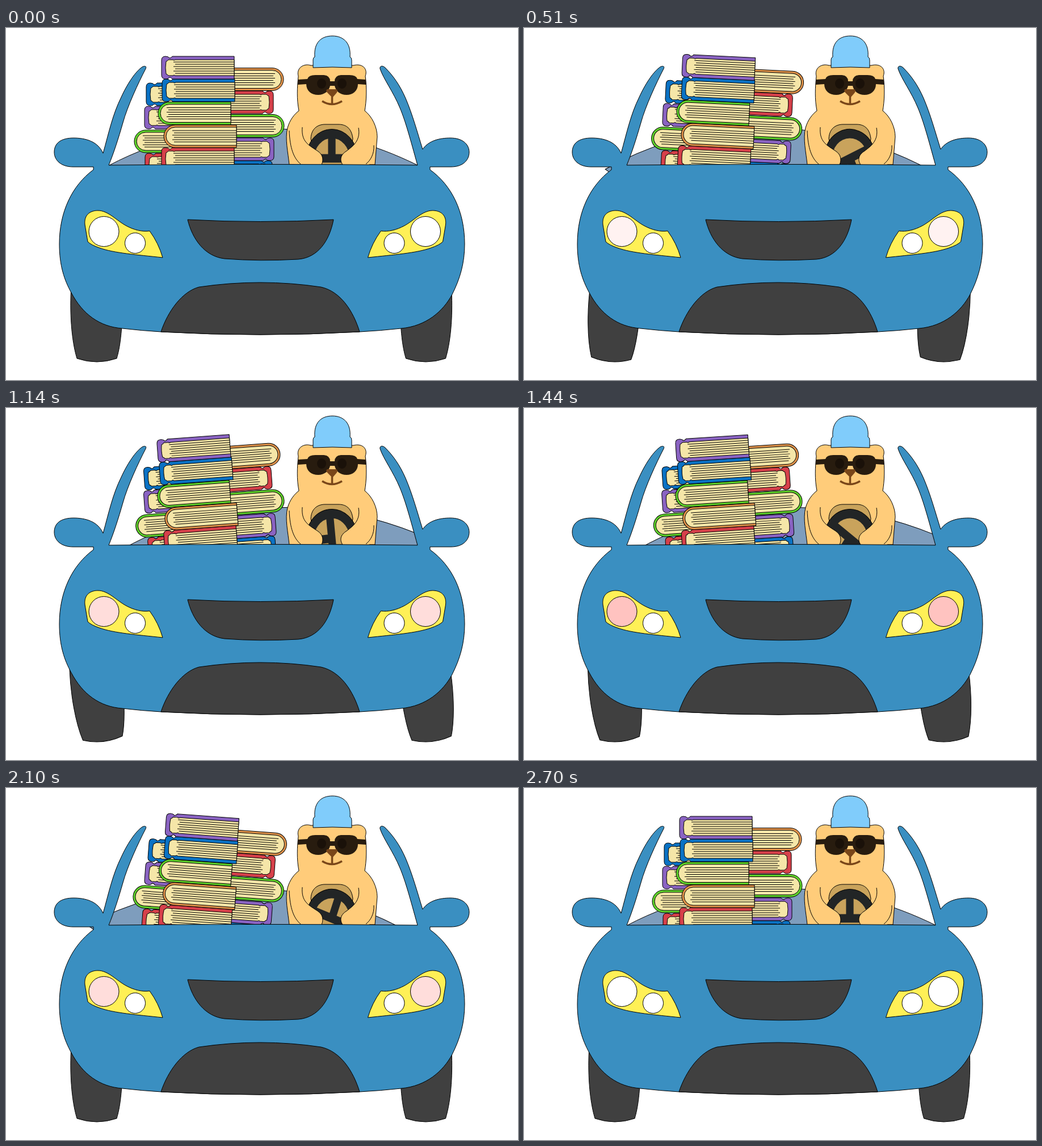
Write an HTML page that moves like this. It is 902 px wide and 621 px high and loops after 2730 ms.

```html
<!DOCTYPE html>
<html lang="en">
<head>
<meta charset="utf-8">
<title>Bear driving a car full of books</title>
<style>
html, body { margin: 0; width: 100%; height: 100%; overflow: hidden; background: #fff; }
svg { display: block; width: 902px; height: 621px; }
.line { fill: none; }
</style>
</head>
<body>
<svg viewBox="0 0 902 621" stroke="#000" stroke-width="1" stroke-linejoin="round">
  <defs>
    <path id="tyre" d="M115 455C112 500 115 550 125 583Q160 595 195 583C202 560 205 530 207 455Z" fill="#404040"/>
    <path id="lamp" d="M139 347C137 328 150 322 162 322C180 322 195 340 212 349C225 356 240 360 253 358Q269 380 276 405C230 400 190 397 165 388Q150 383 144 377Z" fill="#fff056"/>
  </defs>

  <path id="seat" d="M144 264C240 204 340 178 450 177C560 177 650 205 725 242L732 250V280H170Z" fill="#7e9dbd"/>
  <g id="stack"></g>

  <g id="bear">
    <path d="M499 241C497 220 491 195 496 176C500 162 508 152 516 146C512 125 513 105 515 85C511 70 525 62 537 66H612C627 62 638 71 633 85C636 105 635 130 632 146C645 156 654 175 654 192L650 241Z" fill="#ffcc7a"/>
    <path d="M537 195C538 175 552 170 562 170H586C600 170 609 178 611 195L605 241H545Z" fill="#c9a35c"/>
    <g transform="translate(574 230) scale(.88 1)">
      <g id="steer" fill="none" stroke="#222526">
        <circle r="43.5" stroke-width="16"/>
        <path d="M0 -42V0M-42 0H42" stroke-width="15"/>
        <circle r="51.5" stroke="#000"/>
      </g>
    </g>
    <g fill="#ffcc7a">
      <path d="M522 175C520 200 532 206 549 217C558 223 560 232 556 241H508L522 175Z" stroke="none"/>
      <path d="M621 176C625 198 612 208 600 217C590 223 587 232 593 241H640L621 176Z" stroke="none"/>
    </g>
    <path class="line" d="M522 175C520 200 532 206 549 217C558 223 560 232 556 241M621 176C625 198 612 208 600 217C590 223 587 232 593 241M499 181C500 212 507 230 519 240M648 207C649 222 642 234 634 240"/>
    <path d="M541 70V56Q541 52 544 51C542 26 555 14 575 14C595 14 608 27 606 51Q609 52 609 57V70Q575 68 541 70Z" fill="#80ccfb"/>
    <g stroke="none" fill="#281c0f">
      <path d="M514 91L531 90Q533 83 545 83H560Q571 84 571 94H579Q579 84 590 83H605Q617 83 619 90L634 91V100L620 99C620 111 611 118 600 118C588 118 581 111 579 102H571C569 111 561 118 550 118C538 118 529 111 529 99L514 100Z"/>
      <g fill="#1a1109"><ellipse cx="556" cy="98" rx="8" ry="9"/><ellipse cx="592" cy="98" rx="8" ry="9"/></g>
      <path d="M566 108H582Q586 110 582 115L575 123L567 115Q562 110 566 108Z" fill="#7a4719"/>
    </g>
    <path class="line" d="M574.5 121V133M557 129Q574 140 592 129" stroke="#7a4719" stroke-width="3.5"/>
  </g>

  <g id="tyreL"><use href="#tyre"/></g>
  <g id="tyreR"><use href="#tyre" transform="translate(899.5 0) scale(-1 1)"/></g>

  <path d="M154 245H118C98 245 85 234 85 219C85 203 97 194 119 194C140 194 162 200 171 221C181 185 188 152 203 122C213 100 226 80 237 71C242 66 249 66 246 72C233 97 214 138 206 167C198 195 190 220 181 242Q450 239 725 242C712 195 704 165 694 141C682 112 665 90 659 72C658 66 664 66 668 70C682 84 694 101 704 124C716 152 725 185 734 214C745 198 765 194 783 194C804 194 816 205 816 219C816 234 804 245 784 245H747V250C786 278 808 325 808 381C808 415 800 442 786 470C770 500 740 526 696 530Q660 534 623 536Q448 546 273 536Q240 534 205 530C165 527 135 505 115 467C103 445 94 420 94 381C94 325 116 278 154 250Z" fill="#3a8fc1"/>
  <g fill="#404040">
    <path d="M320 338Q448 345 577 338C570 375 550 405 515 408Q448 412 385 407C350 403 328 372 320 338Z"/>
    <path d="M273 536C285 500 310 465 340 457Q448 441 555 457C590 465 612 500 623 536Q448 546 273 536Z"/>
  </g>
  <use href="#lamp"/>
  <use href="#lamp" transform="translate(913.5 0) scale(-1 1)"/>
  <g id="glow"><circle cx="172.5" cy="359" r="26.5"/><circle cx="739" cy="359" r="26.5"/></g>
  <g fill="#fff"><circle cx="227.5" cy="379.5" r="18"/><circle cx="684" cy="379.5" r="18"/></g>
</svg>

<script>
const LOOP = 2730, TICK = 30, SWAY = 270;
const $ = id => document.getElementById(id);

const COLORS = { purple: '#8a63c2', blue: '#0a72c4', green: '#5fd42a', orange: '#e0924a', red: '#d6404a' };
const ROUND = {
  cover: 'M20 0H128V40H20A20 20 0 0 1 20 0Z',
  pages: 'M20 4H128V36H20A16 16 0 0 1 20 4Z',
  from: 15
};
const HARD = {
  cover: 'M7 0Q0 0 0 7V33Q0 40 8 40Q12 40 14 37Q17 37 19 40H128V0H19Q17 3 14 3Q12 0 7 0Z',
  pages: 'M8 9Q11 8 12 6H20Q22 8 24 6H128V34H24Q22 32 20 34H12Q11 32 8 31Q6 20 8 9Z',
  from: 21
};

// spine x, top y, colour, side of the spine (1 left, -1 right)
const BOOKS = [
  [245, 221, 'red', 1], [226, 180, 'green', 1], [244, 138, 'purple', 1], [247, 97, 'blue', 1],
  [469, 234, 'blue', -1], [472, 194, 'purple', -1], [490, 152.5, 'green', -1],
  [471, 111, 'red', -1], [489, 70.5, 'orange', -1],
  [274, 211, 'red', 1], [278, 171, 'orange', 1], [268, 130.5, 'green', 1],
  [275, 90, 'blue', 1], [274, 50, 'purple', 1]
];

function book([x, y, color, side]) {
  const kind = color === 'green' || color === 'orange' ? ROUND : HARD;
  let lines = '';
  for (let i = 0; i < 6; i++) lines += `M${kind.from + (i % 2) * 3} ${10 + i * 4}H128`;
  return `<g transform="translate(${x} ${y}) scale(${side} 1)">
    <path d="${kind.cover}" fill="${COLORS[color]}"/>
    <path d="${kind.pages}" fill="#f5e6a8"/>
    <path class="line" d="${lines}"/></g>`;
}
$('stack').innerHTML = BOOKS.map(book).join('');

// [ms, degrees]
const STEER = [[0, 0], [450, 180], [1350, -180], [1800, 0], [2250, 30], [2700, 0], [LOOP, 0]];
const TYRES = [[0, 0], [450, 4.7], [1100, -6], [1350, -6.3], [1800, 0], [LOOP, 0]];

function at(keys, t) {
  const i = keys.findIndex(k => k[0] > t);
  const [t0, a] = keys[i - 1], [t1, b] = keys[i];
  return a + (b - a) * (t - t0) / (t1 - t0);
}

const turn = (id, deg, x = 0, y = 0) => $(id).setAttribute('transform', `rotate(${deg} ${x} ${y})`);

function draw(now) {
  const t = Math.floor((now % LOOP) / TICK) * TICK;
  const p = (t % SWAY) / SWAY;
  const tilt = -4.3 * Math.sin(2 * Math.PI * p);
  turn('stack', tilt, 354, 168);
  turn('seat', tilt, 450, 235);
  turn('steer', at(STEER, t));
  const lean = at(TYRES, t);
  turn('tyreL', lean, 160, 486);
  turn('tyreR', lean, 739.5, 486);
  const k = Math.pow(1 - Math.abs(2 * p - 1), 1.4);
  $('glow').setAttribute('fill', `rgb(255,${Math.round(255 - 105 * k)},${Math.round(255 - 112 * k)})`);
}

let start;
function loop(now) {
  start ??= now;
  draw(now - start);
  requestAnimationFrame(loop);
}
draw(0);
requestAnimationFrame(loop);
</script>
</body>
</html>
```
